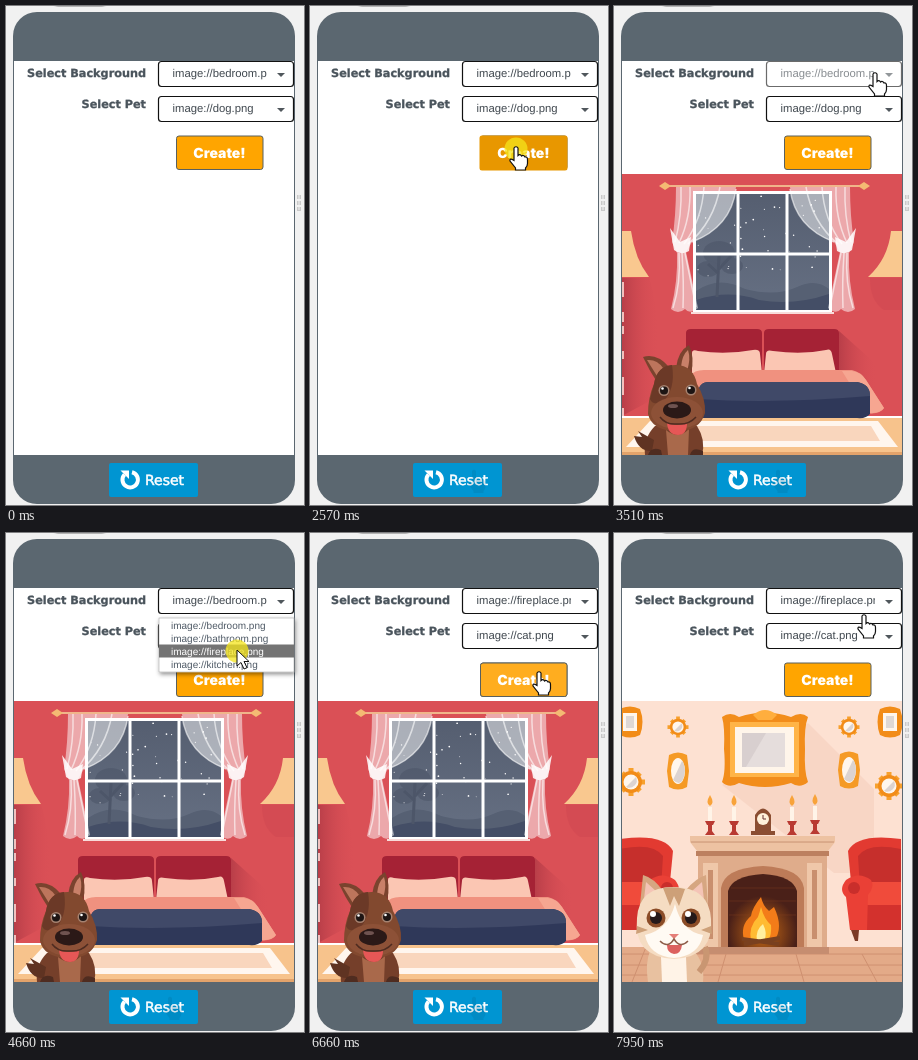
Write an HTML page that moves like this. It is 298 px wide and 499 px high and loops after 8000 ms.

```html
<!DOCTYPE html>
<html lang="en">
<head>
<meta charset="utf-8">
<title>Pet room builder</title>
<style>
html, body { margin: 0; width: 100%; height: 100%; overflow: hidden; background: #f1f1f1; }
svg { display: block; width: 298px; height: 499px; text-rendering: geometricPrecision; }
.label { font: bold 11.25px "DejaVu Sans", sans-serif; fill: #4a545c; stroke: #4a545c; stroke-width: .3; text-anchor: end; }
.value { font: 11.3px "Liberation Sans", sans-serif; fill: #40484f; }
.option { font: 10px "Liberation Sans", sans-serif; fill: #4f5a66; }
.active .option { fill: #fff; }
.create { font: 900 14px Inter, sans-serif; fill: #fff; text-anchor: middle; }
.reset { font: 14px "DejaVu Sans", sans-serif; fill: #fff; stroke: #fff; stroke-width: .5; }
</style>
</head>
<body>
<svg viewBox="0 0 298 499">
<defs>
  <linearGradient id="shade"><stop stop-color="#ad3844" stop-opacity=".75"/><stop offset="1" stop-color="#d94e56" stop-opacity="0"/></linearGradient>
  <linearGradient id="night" x2="0" y2="1"><stop stop-color="#555e70"/><stop offset="1" stop-color="#667083"/></linearGradient>
  <radialGradient id="glow" cy=".8"><stop stop-color="#c96a14"/><stop offset="1" stop-color="#4a2018"/></radialGradient>
  <filter id="soft" x="-10%" y="-20%" width="120%" height="150%"><feDropShadow dx="1" dy="2" stdDeviation="2" flood-opacity=".45"/></filter>
  <filter id="blur"><feGaussianBlur stdDeviation="1.5"/></filter>
  <clipPath id="stageClip"><path d="M8 168.500H288V449H8Z"/></clipPath>
  <clipPath id="valueClip"><path d="M160 50H261V120H160Z"/></clipPath>
  <path id="handShape" d="M-2 0Q0-2.500 2 0V7.500Q4 5.500 5.500 8Q7.500 6.500 9 9Q11.500 8.500 11.500 11.500V15.500Q11.500 18 9.500 20V22H-.5V20L-6 13Q-6.500 9.500-2 12.500Z"/>

  <g id="curtain">
    <path d="M62 181H122Q118 221 78 236L72 246L84 302Q76 309 71 303Q64 309 57 303Q64 275 63 247L58 236Q62 210 62 181Z" fill="#fff" opacity=".5"/>
    <path d="M67 181Q68 210 61 236M76 181Q77 212 65 237M90 181Q88 214 70 238M106 181Q100 216 74 238M122 183Q117 221 78 236M65 247Q67 277 59 302M68 247Q70 277 69 302M71 247Q77 277 82 301" fill="none" stroke="#fff" stroke-width="1.500" opacity=".6"/>
    <path d="M56 222L66 236L77 231L75 245Q67 250 60 244Z" fill="#fff" opacity=".85"/>
  </g>
  <g id="candle">
    <path d="M-2-28H2V-11H-2Z" fill="#fff4e8"/><path d="M0-40Q5-32 0-29Q-5-32 0-40Z" fill="#f8a33a"/>
    <path d="M-5-14H5L3-10H2V-4L5 0H-5L-2-4V-10H-3Z" fill="#b93a32"/>
  </g>
  <g id="roundFrame">
    <path d="M0-14V14M-14 0H14M-9-9L9 9M9-9L-9 9" stroke="#f7a02c" stroke-width="5"/>
    <circle r="11" fill="#f28c18"/><circle r="7.500" fill="#fff6ec"/><path d="M-5 5A7.500 7.500 0 0 0 5-5Z" fill="#dcd3d0"/>
  </g>
  <g id="ovalFrame">
    <path d="M-9-16Q0-21 9-16L11 0L9 16Q0 21-9 16L-11 0Z" fill="#f59a25"/>
    <ellipse rx="7" ry="13" fill="#fff6ec"/><path d="M-5 9Q5 18 7 0Q6-9 4-10Z" fill="#dcd3d0"/>
  </g>
  <g id="boxFrame">
    <path d="M-10-13Q0-18 10-13Q15 0 10 13Q0 18-10 13Q-15 0-10-13Z" fill="#f28c18"/><path d="M-7-9H7V9H-7Z" fill="#fff6ec"/><path d="M-4-6H4V6H-4Z" fill="#ded8d5"/>
  </g>
  <g id="chair">
    <path d="M6 306Q50 300 59 318L55 359H6Z" fill="#e23a31"/><path d="M6 316Q39 309 49 323L47 355H6Z" fill="#c62f2c"/>
    <path d="M6 349H44V377H6Z" fill="#f04b3b"/>
    <path d="M6 372H57V397H6Z" fill="#d3312d"/>
    <path d="M36 347Q48 338 61 347Q69 357 61 364L57 397H40L39 362Q32 354 36 347Z" fill="#ea4036"/>
    <circle cx="53" cy="355" r="6" fill="#c92e2b"/><path d="M48 397H56L52 408H49Z" fill="#7b3a25"/>
  </g>
</defs>

<rect x="50" y="-4" width="48" height="4.500" fill="#777" filter="url(#blur)"/>
<rect x="7" y="6" width="282" height="492" rx="24" fill="#5b6770"/>
<path d="M8 55H288V449H8Z" fill="#fff"/>
<path d="M291 189h4v4h-4zm0 6h4v4h-4zm0 6h4v4h-4z" fill="#c9c9c9"/><path d="M293 189v15" stroke="#f1f1f1"/>

<g clip-path="url(#stageClip)">
<g id="bedroom">
  <path d="M8 168H288V449H8Z" fill="#da5056"/>
  <path d="M8 225H17Q21 253 35 271H8ZM288 225H277Q274 253 254 271H288Z" fill="#f9c88f"/>
  <path d="M8 272H35Q46 300 45 390L8 410Z" fill="url(#shade)"/>
  <path d="M225 325L262 358V390H225Z" fill="url(#shade)"/>
  <path d="M288 272H256Q256 295 270 304H288Z" fill="#d14851" opacity=".6"/>
  <path d="M9 276V291M9 306V316M9 320V328M9 345V353M9 371V389M9 402V411" stroke="#ffe2dc" stroke-width="2" opacity=".8"/>
  <path d="M79 185H218V308H79Z" fill="#fff"/>
  <path d="M82 188H215V304H82Z" fill="url(#night)"/>
  <path d="M82 285Q105 269 131 283Q162 291 183 281Q202 272 215 283V304H82Z" fill="#566073"/>
  <path d="M82 294Q115 283 145 294Q180 300 215 288V304H82Z" fill="#444e66"/>
  <path d="M103 291L105 250M105 268L94 258M105 263L117 250" stroke="#4d5669" stroke-width="3"/>
  <g fill="#4d5669" opacity=".6"><ellipse cx="105" cy="247" rx="16" ry="12"/><ellipse cx="94" cy="263" rx="11" ry="8"/><ellipse cx="118" cy="260" rx="11" ry="8"/></g>
  <g id="stars" fill="#fff"></g>
  <path d="M124 186V307M173 186V307M80 248H217" stroke="#fff" stroke-width="3"/>
  <path d="M77 307H220" stroke="#f8dcda" stroke-width="2"/>
  <path d="M49 180H252" stroke="#f0b58a" stroke-width="2"/><path d="M45 180L51 176L57 180L51 184ZM256 180L250 176L244 180L250 184Z" fill="#f4ba73"/>
  <use href="#curtain"/><use href="#curtain" transform="translate(298) scale(-1 1)"/>

  <path d="M8 412H288V449H8Z" fill="#f7c38c"/><path d="M8 411H288" stroke="#fff" stroke-width="2"/>
  <path d="M36 415H264L284 441H12Z" fill="#fff6ee"/><path d="M48 420H257L266 435H34Z" fill="#f9d6bd"/>
  <path d="M8 446H288V449H8Z" fill="#e3a36b"/>
  <path d="M72 370V327Q72 323 77 323H143Q148 323 148 327V370ZM150 370V327Q150 323 155 323H220Q225 323 225 327V370Z" fill="#a52235"/>
  <path d="M78 347Q78 343 84 345Q112 349 139 344Q146 343 146 348L148 367H78ZM152 348Q152 343 159 345Q188 349 212 344Q217 342 218 348L222 367H150Z" fill="#fbc6b3"/>
  <path d="M76 370Q80 364 90 364H238Q247 366 252 374L270 402Q266 409 252 407L82 409H76Z" fill="#f0917f"/>
  <path d="M228 365H238Q247 366 252 374L270 402Q266 408 254 407Z" fill="#f6a691"/>
  <path d="M84 389Q84 376 95 376H243Q256 378 256 390V408Q252 413 243 412H84Z" fill="#2f3859"/>
  <path d="M84 389Q84 376 95 376H243Q256 378 256 390Q160 398 84 393Z" fill="#404968"/>

  <path d="M31 449Q29 432 41 420H83Q92 434 88 449Z" fill="#753f2a"/>
  <path d="M52 424Q64 434 75 423L74 449H54Z" fill="#a9694b"/>
  <path d="M20 430L28 431L24 425L40 434L38 445Q25 446 20 430Z" fill="#5f3322"/>
  <path d="M43 376Q35 364 29 351Q43 347 55 361Z" fill="#7a432e"/><path d="M33 354Q43 353 49 362L43 370Z" fill="#bd755c"/>
  <path d="M62 362Q64 345 75 339Q81 351 77 368Z" fill="#7a432e"/><path d="M67 361Q68 349 74 344Q77 353 73 365Z" fill="#c98069"/>
  <path d="M40 378Q43 359 62 359Q79 359 83 378Q92 393 91 407Q86 425 63 425Q38 425 34 408Q34 391 40 378Z" fill="#82492f"/>
  <path d="M40 378Q43 360 58 359Q62 384 48 397Q38 399 36 393Z" fill="#6b3927"/>
  <ellipse cx="63" cy="407" rx="26" ry="16" fill="#8d5137"/>
  <path d="M53 417Q63 421 73 417Q73 429 64 429Q54 429 53 417Z" fill="#e65756"/>
  <path d="M46 411Q52 419 63 418Q75 419 82 411" fill="none" stroke="#4e2b20" stroke-width="1.500"/>
  <ellipse cx="63" cy="404" rx="14" ry="8.500" fill="#2b1917"/><ellipse cx="59" cy="400" rx="5" ry="2" fill="#6f5350"/>
  <g fill="#a58270"><circle cx="50" cy="384.500" r="5.500"/><circle cx="77" cy="384" r="5.500"/></g>
  <g fill="#1d1514"><circle cx="50" cy="384.500" r="4"/><circle cx="77" cy="384" r="4"/></g>
  <g fill="#fff"><circle cx="48.500" cy="382.500" r="1.300"/><circle cx="75.500" cy="382" r="1.300"/></g>
  <path d="M34 449Q37 440 47 444L48 449ZM76 449Q78 440 89 445V449Z" fill="#4f2c20"/>
</g>

<g id="fireplace">
  <path d="M8 168H288V449H8Z" fill="#fde1d2"/>
  <path d="M194 190L260 256V340H220L108 252Z" fill="#f7d2c1" opacity=".7"/>
  <path d="M8 414H288V449H8Z" fill="#e3aa88"/>
  <path d="M8 421H288M8 432H288M8 442H288M32 414L18 449M112 421L104 449M180 414L190 449M248 421L263 449" stroke="#cf9070" stroke-width="1"/>
  <path d="M108 184Q116 178 125 184Q151 175 177 184Q187 178 194 184Q190 194 191 216Q190 239 194 249Q186 256 177 250Q151 258 125 250Q115 256 108 249Q112 239 110 216Q111 194 108 184Z" fill="#f28d1b"/>
  <path d="M116 189H185V244H116Z" fill="#ffb447"/><path d="M121 194H180V240H121Z" fill="#fff5ea"/>
  <path d="M128 200H171V234H128Z" fill="#d8cfcf"/><path d="M152 200H171V234H132Z" fill="#e5dddc"/>
  <path d="M139 182Q151 172 163 182L158 187H144Z" fill="#ffae3e"/>
  <use href="#roundFrame" transform="translate(64 194) scale(.75)"/><use href="#roundFrame" transform="translate(235 194) scale(.75)"/>
  <use href="#ovalFrame" x="64" y="238"/><use href="#ovalFrame" x="235" y="237"/>
  <use href="#boxFrame" x="16" y="189"/><use href="#boxFrame" x="276" y="189"/>
  <use href="#roundFrame" x="17" y="249"/><use href="#roundFrame" x="275" y="253"/>
  <use href="#candle" x="96" y="302"/><use href="#candle" x="120" y="302"/>
  <use href="#candle" x="178" y="302"/><use href="#candle" x="201" y="301"/>
  <path d="M137 302V298H141V282Q149 269 157 282V298H161V302Z" fill="#8b4e32"/><circle cx="149" cy="286" r="6" fill="#fff1da"/><path d="M149 282V286H152" fill="none" stroke="#633"/>
  <path d="M84 322H213V418H84Z" fill="#dfac8b"/>
  <path d="M89 330H104V414H89ZM193 330H208V414H193Z" fill="#efc7a9"/><path d="M94 337H99V406H94ZM198 337H203V406H198Z" fill="#c98f6e"/>
  <path d="M76 303H221V309L214 318H83L76 309Z" fill="#edc2a2"/><path d="M82 318H215V323H82Z" fill="#bc8060"/><path d="M77 309H220" stroke="#c89273"/>
  <path d="M107 415V355Q110 335 149 333Q187 335 190 355V415Z" fill="#bd7b58"/>
  <path d="M114 414V358Q118 343 149 341Q179 343 183 358V414Z" fill="url(#glow)"/>
  <path d="M117 355H181M115 368H182M115 382H182" stroke="#8a4320" opacity=".35"/>
  <path d="M130 407Q126 392 137 383Q138 375 147 364Q149 373 155 378L160 374Q170 395 160 408Z" fill="#f37c19"/>
  <path d="M137 408Q134 394 144 384Q146 378 147 374Q150 386 157 392Q158 401 154 408Z" fill="#ffbb32"/><path d="M143 408Q141 397 149 391Q154 401 150 408Z" fill="#fff0a0"/>
  <path d="M128 406L165 411M130 411L166 405" stroke="#79401f" stroke-width="4"/>
  <path d="M82 414H215V421H82Z" fill="#c68d70"/>
  <use href="#chair"/><use href="#chair" transform="translate(293) scale(-1 1)"/>

  <path d="M36 418H80Q91 430 89 449H34Q31 430 36 418Z" fill="#e8c1a0"/><path d="M47 424H72L73 449H48Z" fill="#fff3e7"/>
  <path d="M85 439Q96 426 91 414" fill="none" stroke="#c99672" stroke-width="6"/>
  <path d="M26 372L29 342Q40 345 49 358ZM72 357Q82 345 92 342L94 374Z" fill="#d6a681"/>
  <path d="M30 366L32 349L43 359ZM78 358L88 349L90 367Z" fill="#f4c4b6"/>
  <path d="M23 385Q25 354 59 354Q95 354 97 386Q100 424 60 426Q19 424 23 385Z" fill="#f5dcc2"/>
  <path d="M49 355Q61 353 71 356L65 373L60 363L56 373ZM23 393L34 397L22 401ZM97 393L87 397L98 401Z" fill="#cda078"/>
  <path d="M61 371Q68 399 89 402Q85 423 60 425Q35 423 31 402Q54 397 61 371Z" fill="#fffaf3"/>
  <g fill="#8b4c27"><circle cx="42" cy="385" r="9.500"/><circle cx="77" cy="385" r="9.500"/></g>
  <g fill="#25191a"><circle cx="42" cy="385" r="6"/><circle cx="77" cy="385" r="6"/></g>
  <g fill="#fff"><circle cx="39" cy="381" r="3"/><circle cx="74" cy="381" r="3"/></g>
  <path d="M55 401H65L60 406Z" fill="#e57e78"/><path d="M53 412H68Q67 421 60 421Q53 420 53 412Z" fill="#dc615f"/>
  <path d="M46 408Q54 416 60 406Q66 416 74 408" fill="none" stroke="#8d5c48" stroke-width="1.500"/>
</g>
</g>

<text class="label" x="140" y="71">Select Background</text>
<text class="label" x="140" y="102">Select Pet</text>
<rect x="170.500" y="130" width="86.500" height="33.500" rx="2.500" fill="#ffa500" stroke="#59605f"/>
<rect id="createHover" x="170.500" y="130" width="86.500" height="33.500" rx="2.500" fill="#ffad1f" stroke="#59605f"/>
<rect id="createPress" x="169.500" y="129.500" width="88" height="35" rx="2.500" fill="#e89700"/>
<text class="create" x="213.500" y="151.500">Create!</text>
<g id="fields"></g>

<rect x="103" y="457" width="89" height="34" rx="2" fill="#0095d2"/>
<rect id="resetHover" x="103" y="457" width="89" height="34" rx="2" fill="#0086bd"/>
<path d="M118.500 468.500A7.700 7.700 0 1 0 126 466.200" fill="none" stroke="#fff" stroke-width="4"/><path d="M114.500 464.500H123V473Z" fill="#fff"/>
<text class="reset" x="139" y="479">Reset</text>
<use id="trace" href="#handShape" x="164" y="465" fill="#004b70" opacity=".13"/>

<g id="cursor">
  <circle id="click" cy="1" r="11.500" fill="#f5e51b" opacity=".75"/>
  <use id="hand" href="#handShape" fill="#fff" stroke="#111" stroke-width="1.200"/>
  <path id="arrow" d="M0 0V16L4 12.500L7 19L10 17.700L7 11.500H12Z" fill="#fff" stroke="#111"/>
</g>
</svg>

<script>
const LOOP = 8000;
const $ = id => document.getElementById(id);
const play = (el, frames) => el.animate(frames, { duration: LOOP, iterations: Infinity });

// Opacity is `on` during the given [start, end] spans and `off` elsewhere.
function during(el, spans, on = 1, off = 0) {
  const frames = spans[0][0] > 0 ? [{ offset: 0, opacity: off }] : [];
  for (const [start, end] of spans) {
    frames.push({ offset: start / LOOP, opacity: on });
    if (end < LOOP) frames.push({ offset: end / LOOP, opacity: off });
  }
  frames.push({ offset: 1, opacity: frames.at(-1).opacity });
  play(el, frames.map(f => ({ ...f, easing: 'steps(1, end)' })));
}

const optionText = (name, y) => `<text class="option" x="165" y="${y + 3.5}">image://${name}.png</text>`;

function addField({ y, names, picked, pickTime, hover, open, rows }) {
  const field = document.createElementNS('http://www.w3.org/2000/svg', 'g');
  const value = (name, state) => `<text class="value ${state}" x="166.500" y="${y + 16}">image://${name}.png</text>`;
  const top = y + 30;
  const rowY = i => top + 7 + 13 * i;
  field.innerHTML = `
    <g class="box"><rect x="152.500" y="${y + .5}" width="135" height="25" rx="3" fill="#fff" stroke="#111" stroke-width="1.200"/>
    <g clip-path="url(#valueClip)">${value(names[0], 'before')}${value(names[picked], 'after')}</g>
    <path d="M271 ${y + 12}h8l-4 4z" fill="#50575c"/></g>
    <g class="menu"><rect x="153" y="${top}" width="135" height="54" fill="#fff" stroke="#aaa" stroke-width=".6" filter="url(#soft)"/>
    ${names.map((name, i) => optionText(name, rowY(i))).join('')}
    ${rows.map((_, i) => `<g class="active"><rect x="153" y="${rowY(i) - 6.5}" width="135" height="13" fill="#747474"/>${optionText(names[i], rowY(i))}</g>`).join('')}</g>`;
  $('fields').append(field);
  const part = name => field.querySelector('.' + name);
  during(part('box'), hover, .62, 1);
  during(part('before'), [[0, pickTime]]);
  during(part('after'), [[pickTime, LOOP]]);
  during(part('menu'), [open]);
  field.querySelectorAll('.active').forEach((row, i) => during(row, [rows[i]]));
}

addField({
  y: 90, names: ['dog', 'cat', 'bunny', 'pig'], picked: 1, pickTime: 6260,
  hover: [[5070, 5620]], open: [5410, 6260], rows: [[5410, 5830], [5830, 6260]]
});
addField({
  y: 55, names: ['bedroom', 'bathroom', 'fireplace', 'kitchen'], picked: 2, pickTime: 4790,
  hover: [[3370, 3720]], open: [3720, 4790], rows: [[3720, 4130], [4130, 4270], [4270, 4790]]
});

let seed = 7;
const random = () => (seed = seed * 16807 % 2147483647) / 2147483647;
$('stars').innerHTML = Array.from({ length: 42 }, () =>
  `<circle cx="${84 + random() * 129}" cy="${190 + random() * 80}" r="${.4 + random() * .5}"/>`).join('');

during($('bedroom'), [[2630, 7400]]);
during($('fireplace'), [[7400, LOOP]]);
during($('resetHover'), [[480, 1200]]);
during($('trace'), [[1200, LOOP]], .13);
during($('createHover'), [[1610, 2500], [2630, 3020], [6460, 6800], [6940, 7880]]);
during($('createPress'), [[2500, 2630], [6800, 6940]]);
during($('click'), [[2500, 2630], [3650, 3790], [4590, 4790], [5410, 5550], [6060, 6260], [6800, 6940]], .75);

const handSpans = [[480, 1200], [1610, 4060], [5070, 5720], [6460, LOOP]];
during($('hand'), handSpans);
during($('arrow'), handSpans, 0, 1);

// time, x, y
const path = [
  [0, 210, 520], [320, 206, 500], [670, 164, 465], [1130, 164, 465], [1340, 225, 204],
  [1540, 225, 204], [1680, 205, 141], [2010, 205, 141], [2150, 206, 142], [2820, 206, 142],
  [3100, 230, 130], [3510, 261, 68], [3580, 261, 67], [3900, 261, 67], [4400, 231, 117],
  [4790, 231, 117], [5210, 234, 107], [5600, 234, 107], [5950, 212, 140], [6260, 212, 140],
  [6600, 229, 140], [7750, 229, 140], [7950, 250, 83], [LOOP, 250, 83]
];
play($('cursor'), path.map(([time, x, y]) => ({
  offset: time / LOOP, transform: `translate(${x}px, ${y}px)`, easing: 'ease-in-out'
})));
</script>
</body>
</html>
```
